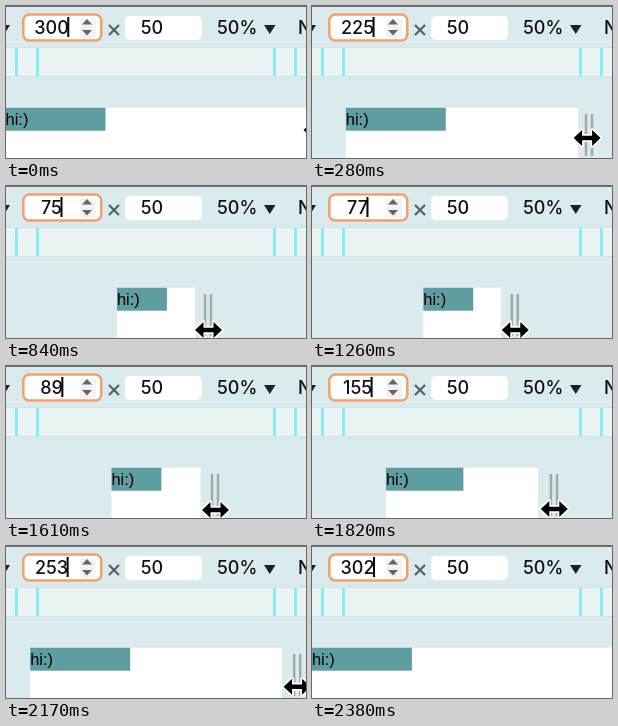
An HTML page for the animation above (2.45 s loop, 300x152 px).

```html
<!DOCTYPE html>
<html lang="en">
<head>
<meta charset="utf-8">
<title>Resizing a viewport</title>
<style>
  html, body { margin: 0; width: 100%; height: 100%; overflow: hidden; background: #dbebed; }
  svg { display: block; width: 100vw; height: 100vh; }
  text { font: 500 18px Inter, sans-serif; fill: #111; }
  .middle { text-anchor: middle; }
  #greeting { font: 16.5px "Liberation Sans", Arial, sans-serif; fill: #000; }
</style>
</head>
<body>
<svg viewBox="0 0 300 152" preserveAspectRatio="none">
  <rect width="300" height="152" fill="#dbebed"/>
  <rect width="300" height="1" fill="#6c7576"/>

  <!-- toolbar -->
  <path d="M-7 19H4L-1.500 28ZM258 19H269.500L263.750 28Z" fill="#1c2224"/>
  <rect x="17.300" y="8.600" width="78" height="26" rx="6" fill="#fff" stroke="#f4a06c" stroke-width="2.500"/>
  <rect x="74" y="12" width="16" height="20" rx="3" fill="#f3f3f3"/>
  <path d="M76 18.500L81 13L86 18.500ZM76 24L81 29.500L86 24Z" fill="#666"/>
  <text id="width" class="middle" x="45.500" y="28"></text>
  <rect id="caret" y="11" width="2" height="20" fill="#000"/>
  <path d="M103 19L113 29M113 19L103 29" stroke="#566062" stroke-width="2.200"/>
  <rect x="119" y="10" width="77" height="24" rx="5" fill="#fff"/>
  <text class="middle" x="146" y="28">50</text>
  <text x="211" y="28">50%</text>
  <text x="292" y="28">No</text>

  <!-- ruler -->
  <rect y="41" width="300" height="30" fill="#d0e1e3"/>
  <rect y="42" width="300" height="28" fill="#ebf4f5"/>
  <path d="M10.500 42V70M31.500 42V70M268.500 42V70M289.500 42V70" stroke="#85ebf7" stroke-width="2.800"/>

  <!-- resized page -->
  <rect id="page" y="101.700" height="51" fill="#fff"/>
  <rect id="bar" y="101.700" height="23" fill="#5f9ea0"/>
  <text id="greeting" y="119">hi:)</text>
  <path id="handle" d="M-3 108V150M3 108V150" stroke="#a3a8a9" stroke-width="2.500"/>
  <path id="cursor" d="M-13.500 0L-5 -8V-2.200H5V-8L13.500 0L5 8V2.200H-5V8Z"
        fill="#000" stroke="#fff" stroke-width="3.500" stroke-linejoin="round" paint-order="stroke"/>
</svg>
<script>
const LOOP = 2450, STEP = 70, PAGE_LAG = 12;

// The drag: time, viewport width, pointer height
const DRAG = [
  [0, 300, 124], [140, 300, 124], [280, 225, 132], [560, 125, 136], [840, 75, 144],
  [1120, 75, 144], [1470, 79, 144], [1610, 89, 144], [2030, 221, 142], [2380, 302, 139]
];

const el = id => document.getElementById(id);
const set = (id, attrs) => {
  for (const name in attrs) el(id).setAttribute(name, attrs[name]);
};
const clamp = (value, low, high) => Math.min(high, Math.max(low, value));

function dragAt(time) {
  const next = Math.max(1, DRAG.findIndex(point => point[0] >= time));
  const from = DRAG[next - 1], to = DRAG[next];
  const part = clamp((time - from[0]) / (to[0] - from[0]), 0, 1);
  return from.map((value, i) => value + (to[i] - value) * part);
}

function draw(time) {
  const [, width, pointerY] = dragAt(time);
  const pageWidth = dragAt(time - PAGE_LAG)[1] + 1;
  const left = 150 - pageWidth / 2;
  // The pointer drifts outwards a little as it moves down.
  const pointerX = 161 + width / 2 + (pointerY - 124) * 0.2;
  const field = el("width");
  field.textContent = Math.round(width);
  set("caret", { x: 45 + field.getComputedTextLength() / 2 - 1 });
  set("page", { x: left, width: pageWidth });
  set("bar", { x: left, width: clamp(width / 2, 50, 100) });
  set("greeting", { x: left });
  set("handle", { transform: `translate(${164.5 + width / 2} 0)` });
  set("cursor", { transform: `translate(${pointerX} ${pointerY})` });
}

const start = performance.now();
function tick() {
  const elapsed = (performance.now() - start) % LOOP;
  draw(Math.floor(elapsed / STEP) * STEP);
  requestAnimationFrame(tick);
}
tick();
</script>
</body>
</html>
```
